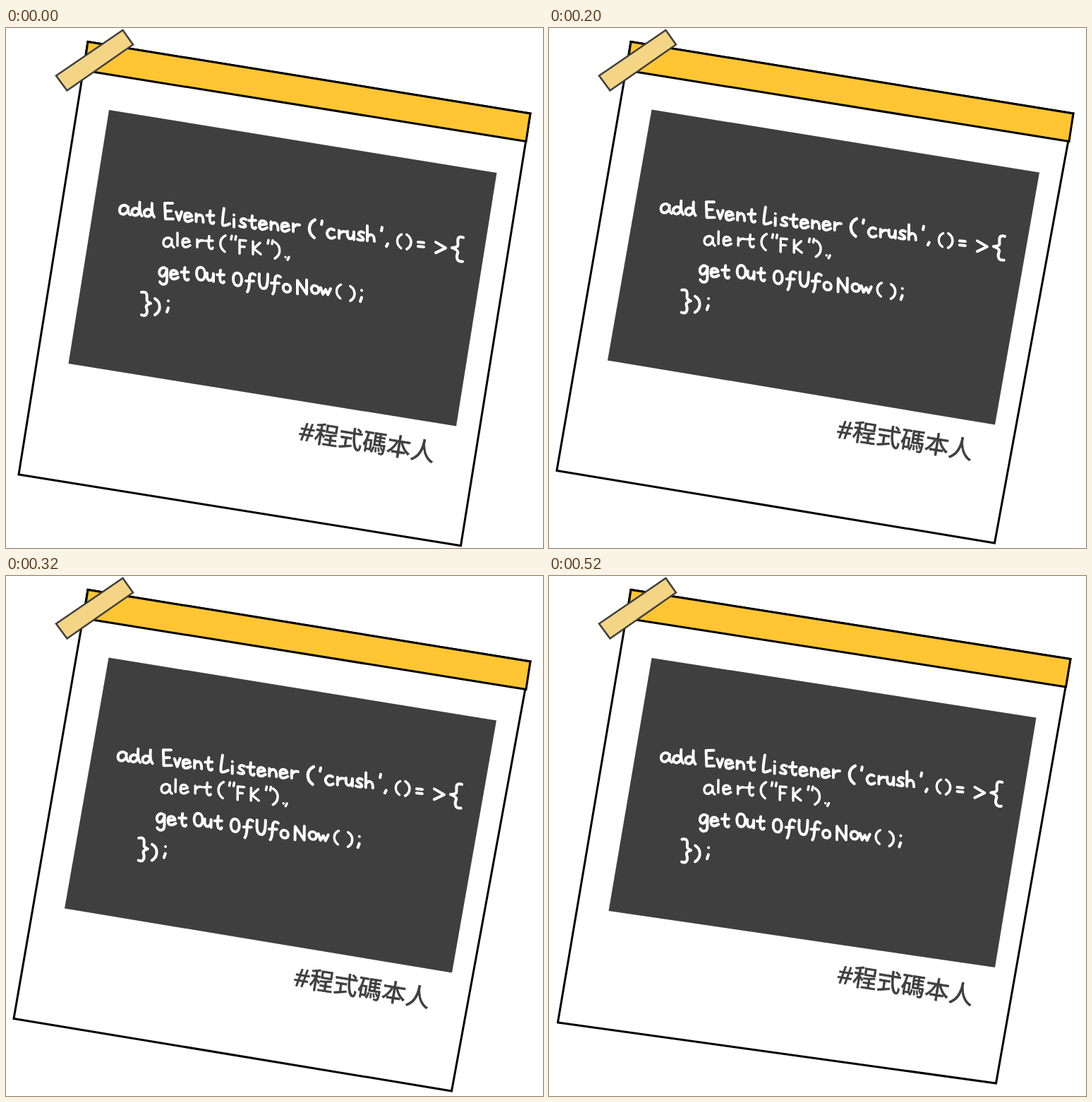
Animation of 761x736 px, one loop 600 ms. Source, as an HTML page:

```html
<!DOCTYPE html>
<html lang="zh-TW">
<head>
<meta charset="utf-8">
<style>
html, body { margin: 0; width: 100%; height: 100%; overflow: hidden; background: #fff; }
svg { display: block; }
#card, #bar { stroke: #000; stroke-width: 3; }
#code { fill: none; stroke: #fff; stroke-linecap: round; stroke-linejoin: round; }
#caption { font: 500 34.5px "Noto Sans CJK TC", "Noto Sans CJK", sans-serif; fill: #3f3f3f; stroke: #3f3f3f; stroke-width: .8; }
#caption tspan { font-family: "Open Sans", sans-serif; }
</style>
</head>
<body>
<svg width="761" height="736" viewBox="0 0 761 736">
  <polygon id="card" fill="#fff"/>
  <polygon id="bar" fill="#ffc533"/>
  <polygon id="panel" fill="#3f3f3f"/>
  <g id="code" role="img" aria-label="addEventListener('crush', () => { alert(&quot;FK&quot;); getOutOfUfoNow(); });"></g>
  <g id="caption"><text transform="translate(413.5 582.5) rotate(9.2)"><tspan>#</tspan>程式碼本人</text></g>
  <polygon points="165.5,3 180,23.5 86.5,88.5 71,67.5" fill="#f3d585" stroke="#3f3f3f" stroke-width="2.5"/>
</svg>
<script>
const el = id => document.getElementById(id);

// Handwritten letters: advance width and pen path, baseline at y = 0
const glyphs = {
  a: [17.5, 'M13-11C8-17 1-12 1-6S8 2 13-7M13-12Q12-3 16-1'],
  d: [17.5, 'M11-9C6-14 0-9 1-4S10 1 12-9M12-20Q11-5 15-1'],
  E: [16, 'M12-24L1-23L2-1L13-2M2-12L10-13'],
  v: [12, 'M1-12L5-1L9-13'],
  e: [15.5, 'M2-6L11-8C10-14 1-14 1-6S7 1 12-3'],
  n: [16, 'M2-12V-1M2-7C6-13 12-13 12-1'],
  t: [15, 'M6-18Q4-3 7-1T11-2M1-11L11-12'],
  L: [16, 'M4-25Q1-5 2-2T12-4'],
  i: [9, 'M2-11V0M2-17v.1'],
  s: [13, 'M10-12C4-15 0-9 5-7S11-1 7-1 2-1 1-2'],
  r: [13, 'M2-12V-1M2-6Q5-12 11-11'],
  c: [16, 'M11-12C4-16-1-8 2-3S9 0 12-2'],
  u: [14, 'M1-12C0-3 3-1 6-2S10-7 10-12V-1'],
  h: [15, 'M2-22V-1M2-6C6-12 12-12 12-1'],
  l: [7, 'M1-19V-1'],
  F: [14, 'M2-19V0M2-19H11M2-10H9'],
  K: [16, 'M2-18V0M12-17L3-8L13-1'],
  g: [16, 'M12-13C5-18-1-9 2-4S11-4 12-13V2C12 11 4 10 2 6'],
  O: [15, 'M7-19C-1-19-1-1 7-1S15-19 7-19Z'],
  f: [18, 'M14-19C8-23 6-18 6-12Q6 2 3 6M1-9L12-10'],
  U: [18, 'M1-21C0-6 2-1 7-1S13-8 13-22'],
  o: [13, 'M6-12C-1-12-1-1 6-1S13-12 6-12Z'],
  N: [19, 'M2 0V-19L15-1V-21'],
  w: [16, 'M1-10L4-1L8-8L11-1L15-10'],
  '(': [12, 'M9-23C0-18-1-6 8 0'],
  ')': [12, 'M1-23C10-18 10-6 1 0'],
  '{': [18, 'M17-33C5-36 11-22 9-20S1-17 1-17 11-15 9-10 7 3 16 1'],
  '}': [18, 'M1-32C13-35 7-22 9-20S14-17 14-17 6-15 8-10 9 3 1 0'],
  "'": [4, 'M2-22L1-17'],
  '"': [10, 'M2-22L1-17M8-22L7-17'],
  ',': [4, 'M3-1L1 3'],
  '.': [4, 'M2-1v.1'],
  ';': [6, 'M3-14v.1M3-4L1 2'],
  '=': [12, 'M1-9H9M1-3H9'],
  '>': [16, 'M1-16L15-9L1-1'],
};

// Each line: slope in degrees, pen width, then its words as text x y [size]
const lines = [
  [5, 4, `add 160 264|Event 224 271|Listener 305 280|( 428 296 1.1|' 446 295|crush 454 297|' 531 304
    |, 538 306|( 553 311 .85|) 567 313 .9|= 583 312|> 608 319|{ 631 328`],
  [5, 3.5, `a 222 310|le 242 309|rt 269 311|( 302 316|" 318 316|F 329 319|K 348 320|" 370 322|) 380 326|. 394 325|, 398 325`],
  [6, 4, `get 216 353|Out 269 357|O 321 365|f 339 367|U 358 369|f 375 370|o 392 374|N 411 376|ow 432 376
    |( 467 382 .85|) 487 386 .9|; 501 385`],
  [3, 4, `} 191 406|) 210 406|; 227 400`],
];

function write(slope, text, x, y, size = 1) {
  let pen = 0, out = '';
  for (const ch of text) {
    const [width, d] = glyphs[ch];
    out += `<path d="${d}" transform="translate(${pen})"/>`;
    pen += width;
  }
  return `<g transform="translate(${x} ${y}) skewY(${slope}) scale(${size})">${out}</g>`;
}

el('code').innerHTML = lines.map(([slope, width, words]) => `<g stroke-width="${width}">` +
  words.split('|').map(word => write(slope, ...word.trim().split(' '))).join('') + '</g>').join('');

// Corners run clockwise from the top left
const poses = [
  { card: [[116, 19.5], [743, 121], [644.5, 732.7], [18, 632]], bar: [737, 160.5],
    panel: [[146, 116], [695.5, 205], [638, 563.5], [88.5, 475]], caption: [0, 0] },
  { card: [[116, 19.5], [743, 121], [631.5, 729], [11, 626.5]], bar: [737, 160.5],
    panel: [[145.5, 115.5], [695, 204.5], [632, 561.5], [83, 470.5]], caption: [-7, -3] },
  { card: [[116, 19.5], [739, 117.5], [633.5, 718], [12.5, 632]], bar: [732.5, 157],
    panel: [[145.5, 116], [690.5, 200.5], [632, 554], [84.5, 474]], caption: [-6.5, -7] },
];

function basis([[x, y], [rx, ry], , [bx, by]]) {
  return new DOMMatrix([rx - x, ry - y, bx - x, by - y, x, y]);
}
const rest = basis(poses[0].panel).inverse();

function show({ card, bar, panel, caption }) {
  el('card').setAttribute('points', card);
  el('bar').setAttribute('points', [card[0], card[1], bar, [110, 60]]);
  el('panel').setAttribute('points', panel);
  el('code').setAttribute('transform', basis(panel).multiply(rest));
  el('caption').setAttribute('transform', `translate(${caption})`);
}

const start = performance.now();
function tick() {
  show(poses[Math.floor((performance.now() - start) / 200) % 3]);
  requestAnimationFrame(tick);
}
tick();
</script>
</body>
</html>
```
